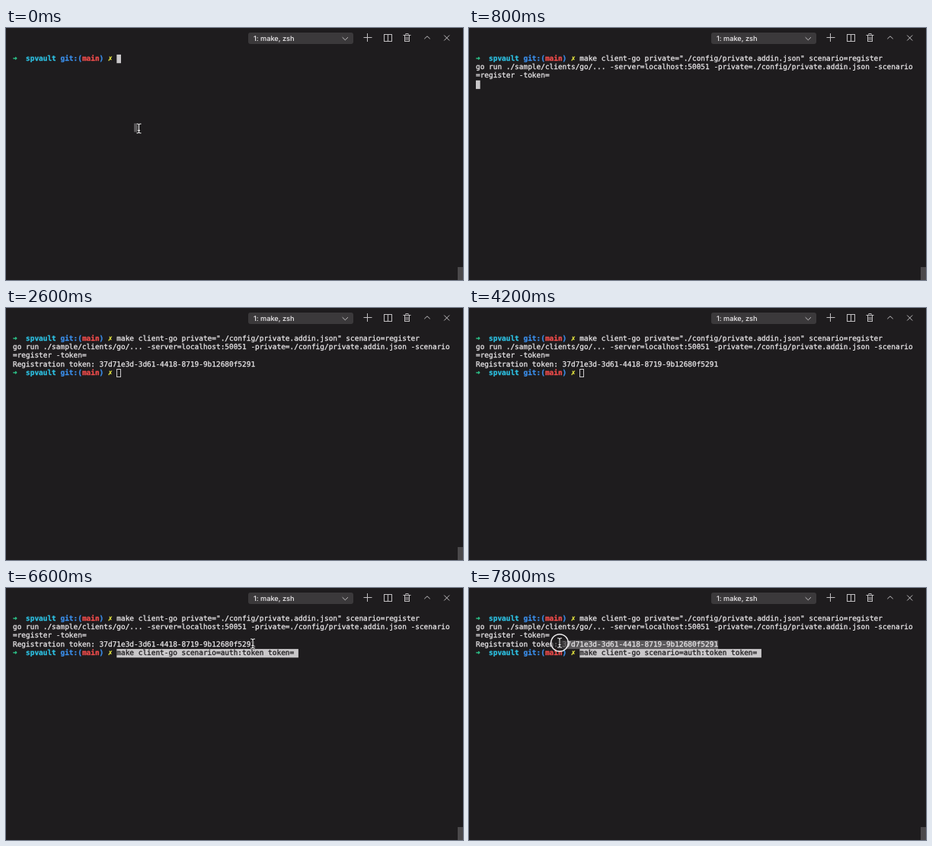
These frames come from a looping animation (600x331 px, 8 s). An HTML page with a canvas:

```html
<!DOCTYPE html>
<html lang="en">
<head>
<meta charset="utf-8">
<title>Terminal</title>
<style>
  html, body { margin: 0; width: 100%; height: 100%; overflow: hidden; background: #1e1c1e; }
  canvas { display: block; }
</style>
</head>
<body>
<canvas id="stage" width="600" height="331"></canvas>
<script>
const ctx = document.getElementById('stage').getContext('2d');
const LOOP = 8000, STEP = 200;
const LEFT = 9, TOP = 34.9, CELL = 5.68, ROW = 11.3, BASELINE = 7.7;
const BG = '#1e1c1e', FG = '#e6e4e6', BLOCK = '#c9c7c9', SELECT = '#5b595b', ICON = '#c0bec0';
const MONO = '9.43px "DejaVu Sans Mono", monospace';
const SANS = '500 9.2px Inter, sans-serif';

const PROMPT = [
  ['➜  ', '#2fcf91'], ['spvault ', '#2dbfe0'], ['git:(', '#3b8eea'],
  ['main', '#f14c4c'], [') ', '#3b8eea'], ['✗ ', '#eeee42']
];
const INPUT = PROMPT.reduce((col, [text]) => col + text.length, 0);
const REGISTER = 'make client-go private="./config/private.addin.json" scenario=register';
const OUTPUT = [
  'go run ./sample/clients/go/... -server=localhost:50051 -private=./config/private.addin.json -scenario',
  '=register -token='
];
const TOKEN = 'Registration token: 37d71e3d-3d61-4418-8719-9b12680f5291';
const AUTH = 'make client-go scenario=auth:token token=';

// Moments when the picture changes
const AT = {
  paste: 400, run: 600, token: 1600, blur: 2200, idle: 3000, focus: 4800,
  paste2: 5000, move: 5200, arrive: 6200, press: 7000
};
const REST = [187, 137], TOKEN_END = [324, 73], TOKEN_START = [119, 72];

const cellX = col => LEFT + col * CELL;
const cellY = row => TOP + row * ROW;

function cells(col, row, count, color) {
  ctx.fillStyle = color;
  ctx.fillRect(cellX(col), cellY(row), count * CELL, ROW);
}

// Each character sits in its own grid cell; a hairline stroke adds weight
function put(col, row, text, color = FG, bold = false) {
  ctx.font = (bold ? 'bold ' : '') + MONO;
  ctx.fillStyle = ctx.strokeStyle = color;
  ctx.lineWidth = 0.3;
  const y = Math.round(cellY(row) + BASELINE);
  [...text].forEach((ch, i) => {
    ctx.fillText(ch, cellX(col + i), y);
    ctx.strokeText(ch, cellX(col + i), y);
  });
}

function prompt(row) {
  let col = 0;
  for (const [text, color] of PROMPT) {
    put(col, row, text, color, true);
    col += text.length;
  }
}

function cursor(col, row, focused) {
  if (focused) return cells(col, row, 1, BLOCK);
  ctx.strokeStyle = BLOCK;
  ctx.lineWidth = 1;
  ctx.strokeRect(Math.round(cellX(col)) + 0.5, Math.round(cellY(row)) + 0.5, 5, 10);
}

function pasted(col, row, text) {
  cells(col, row, text.length + 1, BLOCK);
  put(col, row, text, BG);
}

function line(x1, y1, x2, y2) {
  ctx.beginPath();
  ctx.moveTo(x1, y1);
  ctx.lineTo(x2, y2);
  ctx.stroke();
}

// Positive rise points down, negative points up
function chevron(x, y, rise) {
  for (const side of [-1, 1]) line(x + side * 3.7, y - rise, x, y + rise);
}

function trash(x, y) {
  ctx.strokeRect(x - 3, y - 3, 6, 8);
  ctx.strokeRect(x - 1.5, y - 5, 3, 2);
  line(x - 5, y - 3, x + 5, y - 3);
  for (const side of [-1, 1]) line(x + side * 1.2, y - 1, x + side * 1.2, y + 3.5);
}

function toolbar() {
  const y = 12.5;
  ctx.fillStyle = '#3b393b';
  ctx.beginPath();
  ctx.roundRect(318, 6, 138, 15, 3);
  ctx.fill();
  ctx.font = SANS;
  ctx.fillStyle = '#f0eef0';
  ctx.fillText('1: make, zsh', 325, 17);

  ctx.strokeStyle = ICON;
  ctx.lineWidth = 1;
  chevron(445.3, 14, 1.8);
  chevron(553, y, -1.7);
  line(469.5, y, 480.5, y);
  line(474.5, y - 5.5, 474.5, y + 5.5);
  ctx.strokeRect(496.5, y - 4, 10, 9);
  line(501.5, y - 4, 501.5, y + 5);
  trash(526.5, y);
  for (const side of [-1, 1]) line(575.2, y + 0.5 - side * 3.5, 582.2, y + 0.5 + side * 3.5);
}

function scrollbar() {
  ctx.fillStyle = '#4b494b';
  ctx.fillRect(593, 314, 7, 17);
}

function beam(x, y) {
  line(x, y - 5, x, y + 5);
  line(x - 1.5, y + 2.5, x + 1.5, y + 2.5);
  for (const end of [-1, 1])
    for (const side of [-1, 1]) {
      line(x, y + end * 5, x + side, y + end * 6);
      line(x + side, y + end * 6, x + side * 3, y + end * 6);
    }
}

function pointer(x, y, pressed) {
  if (pressed) {
    ctx.beginPath();
    ctx.arc(x, y, 11.3, 0, Math.PI * 2);
    ctx.fillStyle = 'rgba(30,28,30,.6)';
    ctx.fill();
    ctx.strokeStyle = '#eeecee';
    ctx.lineWidth = 1.4;
    ctx.stroke();
  }
  for (const [color, width] of [['#111', 2.6], ['#f4f2f4', 1.1]]) {
    ctx.strokeStyle = color;
    ctx.lineWidth = width;
    beam(x, y);
  }
}

function glide(from, to, t, start, end) {
  const k = Math.min(1, Math.max(0, (t - start) / (end - start)));
  const eased = k * k * (3 - 2 * k);
  return from.map((v, i) => v + (to[i] - v) * eased);
}

function pointerAt(t) {
  if (t < AT.paste) return [174.5, 132];
  if (t < AT.focus) return null;
  if (t < AT.press) return glide(REST, TOKEN_END, t, AT.move, AT.arrive);
  return glide(TOKEN_END, TOKEN_START, t, AT.press, LOOP - STEP);
}

function terminal(t, mouse) {
  prompt(0);
  if (t < AT.paste) {
    cells(28, 8, 1, SELECT);
    return cursor(INPUT, 0, true);
  }
  if (t < AT.run) return pasted(INPUT, 0, REGISTER);

  put(INPUT, 0, REGISTER);
  OUTPUT.forEach((text, i) => put(0, i + 1, text));
  if (t < AT.token) return cursor(0, 3, true);

  if (t > AT.press) {
    const start = Math.round((mouse[0] - LEFT) / CELL);
    cells(start, 3, TOKEN.length - start, SELECT);
  }
  put(0, 3, TOKEN);
  prompt(4);
  if (t < AT.paste2) cursor(INPUT, 4, t < AT.blur || t >= AT.focus);
  else pasted(INPUT, 4, AUTH);
}

function draw(now) {
  const t = Math.floor((now % LOOP) / STEP) * STEP;
  const mouse = pointerAt(t);
  ctx.fillStyle = BG;
  ctx.fillRect(0, 0, 600, 331);
  toolbar();
  if (t < AT.idle || t >= AT.focus) scrollbar();
  terminal(t, mouse);
  if (mouse) pointer(...mouse, t >= AT.press);
}

ctx.textRendering = 'geometricPrecision';
const began = performance.now();
function tick() {
  draw(performance.now() - began);
  requestAnimationFrame(tick);
}
tick();
</script>
</body>
</html>
```
